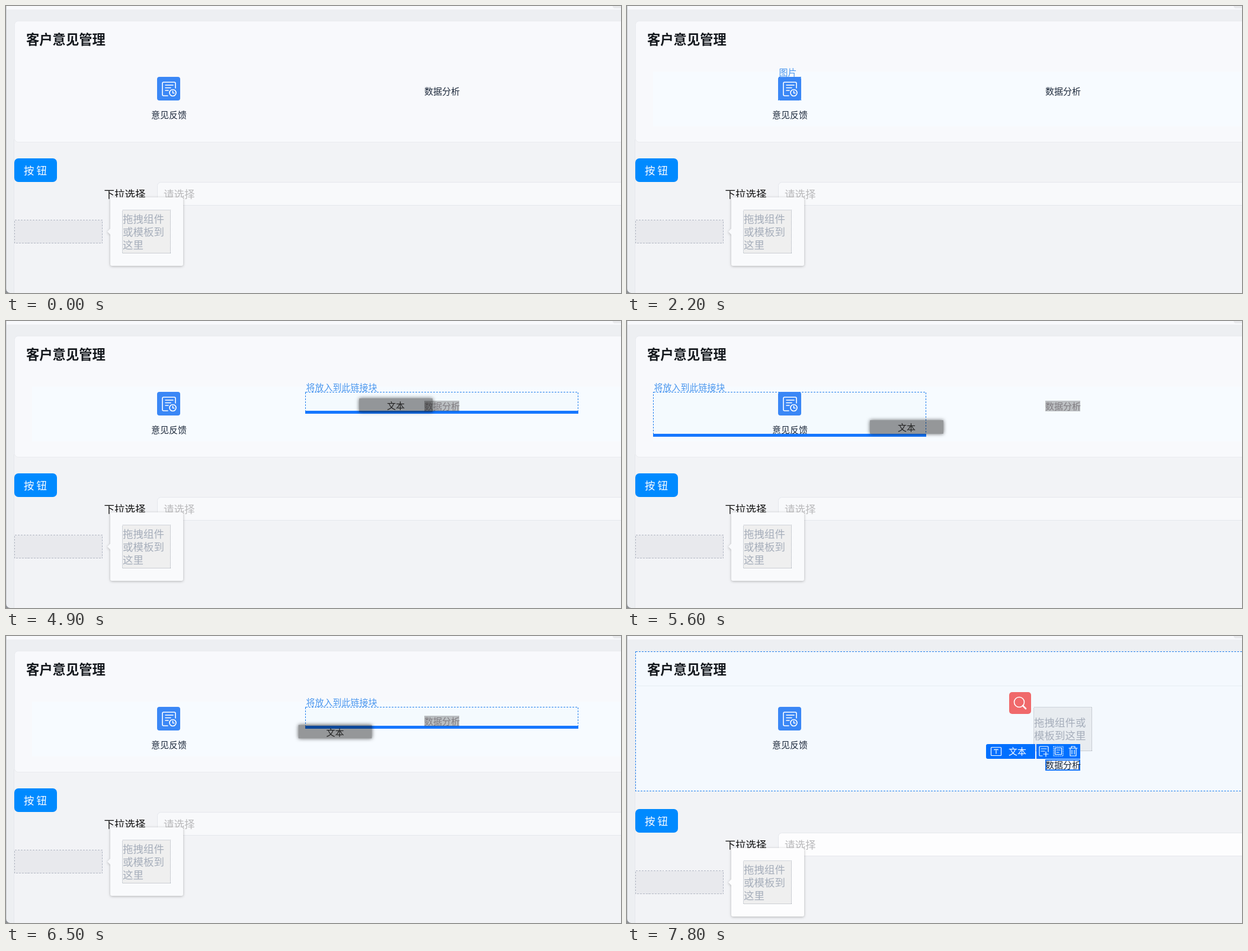
Animation, 1038 px wide and 486 px high, one loop 8000 ms. Source, as an HTML page:

```html
<!DOCTYPE html>
<html lang="zh-CN">
<head>
<meta charset="utf-8">
<title>页面编辑器</title>
<style>
  html, body { margin: 0; width: 100%; height: 100%; overflow: hidden; background: #edeff2; }
  svg { display: block; width: 1038px; height: 486px; }
  text, #pill { font: 17.5px "Noto Sans CJK SC", "Noto Sans", sans-serif; white-space: pre; }
  .sm { font-size: 15px; fill: #1f2b3d; }
  .title { font-size: 22.3px; font-weight: 700; fill: #14181d; }
  .hint { fill: #a6aebb; }
  .card { fill: #f8f9fc; stroke: #e9ebef; }
  .field { fill: #f8f9fb; stroke: #e5e7ec; }
  .pop { fill: #f9fafc; filter: drop-shadow(0 1px 2px #0004); }
  .done .field, .done .pop { fill: #fdfdfe; }
  .dots { stroke: #a9afb9; stroke-dasharray: 1 1; }
  .dash { stroke-dasharray: 3 2; }
  .dots, .dash { shape-rendering: crispEdges; }
  .icon { fill: none; stroke: #fff; stroke-width: 1.6; stroke-linecap: round; stroke-linejoin: round; }
  .thin { stroke-width: 1.2; }
  #frame { fill: #f4fafee6; stroke: #2482ee; }
  #label { fill: #4b97ee; }
  #bar { fill: #1677ff; }
  #pill {
    position: absolute; left: 0; top: 0; width: 124px; height: 23px;
    font-size: 15px; line-height: 23px; text-align: center; color: #222;
    background: #0006; border-radius: 1px; box-shadow: 0 0 6px #0009;
  }
</style>
</head>
<body>
<svg id="stage" viewBox="0 0 1038 486">
  <rect width="1038" height="486" fill="#edeff2"/>
  <rect x="14" y="200" width="1024" height="286" fill="#f2f3f6"/>
  <path d="M13.5 226V486" stroke="#e6e8ec"/>
  <rect width="1038" height="6" fill="#f8f9fc"/>
  <path d="M1024 0h14v4h-10q-4 0-4-4" fill="#e9eaed"/>
  <path d="M.5 0V486" stroke="#c9ccd1"/>
  <path d="M0 479v7h7q-6-1-7-7" fill="#8d9095"/>

  <rect id="card" class="card" x="14.5" y="25.5" width="1040" height="205" rx="6"/>
  <rect id="wash" x="44" y="111" width="994" height="93" fill="#f7fbff"/>
  <g id="hover">
    <rect id="frame" class="dash"/>
    <path id="rule" d="M15 84.5H1038" stroke="#e7eef3"/>
  </g>
  <text class="title" x="34" y="57" dy=".38em">客户意见管理</text>

  <rect x="255" y="120" width="39" height="40" rx="4" fill="#3a87f6"/>
  <g class="icon">
    <path d="M273 152h-7q-2 0-2-2v-19q0-2 2-2h18q2 0 2 2v8M269 134h13M269 138.500h9M269 143h5"/>
    <circle cx="281.500" cy="147" r="5.500"/>
    <path d="M281.500 144v3.500h2.500"/>
  </g>
  <text class="sm" x="245" y="184.500" dy=".38em">意见反馈</text>

  <rect id="bar" height="5" width="461"/>
  <text id="label" class="sm" dy=".38em"/>

  <g id="drop">
    <rect class="dots" x="686.500" y="120.500" width="98" height="74" fill="#e8ecf0"/>
    <text class="hint" x="687" y="146" dy=".38em">拖拽组件或</text>
    <text class="hint" x="687" y="168" dy=".38em">模板到这里</text>
    <path d="M609 183h80v25h-80q-3 0-3-3v-19q0-3 3-3M691 183h74v25h-74z" fill="#0070ff"/>
    <g class="icon thin">
      <rect x="614.500" y="188.500" width="17" height="14" rx="1"/>
      <path d="M620 193v-1h6v1M623 192v7"/>
      <path d="M701 203h-4q-1 0-1-1v-14q0-1 1-1h13q1 0 1 1v8M699 191h9M699 195h6M707 196v8M703 200h8"/>
      <rect x="720" y="187" width="16" height="16" stroke-dasharray="1 2"/>
      <rect x="722.500" y="189.500" width="11" height="11"/>
      <path d="M725 193h6M725 197h4"/>
      <path d="M746 190h14M750 190v-3h6v3M748 190v13h10v-13M751 193v7M755 193v7"/>
    </g>
    <text class="sm" x="644" y="195.500" dy=".38em" style="fill:#fff">文本</text>
    <rect x="707" y="210" width="57" height="17" fill="none" stroke="#1677ff" stroke-width="2"/>
  </g>
  <rect id="held" x="706" y="135" width="59" height="18" fill="#0000003d"/>
  <text id="data" class="sm" x="706" dy=".38em">数据分析</text>

  <g id="red">
    <rect id="redBg" x="645" y="95" width="37" height="37" rx="5"/>
    <g class="icon"><circle cx="662" cy="112" r="8.500"/><path d="M668 118l5 5" stroke-width="2.600"/></g>
  </g>

  <g id="lower">
    <rect x="14" y="258" width="72" height="40" rx="7" fill="#008aff"/>
    <text x="30" y="278" dy=".38em" fill="#fff">按 钮</text>
    <text x="165.500" y="318" dy=".38em" fill="#111">下拉选择</text>
    <rect class="field" x="255.500" y="298.500" width="800" height="39" rx="6"/>
    <text x="266" y="318" dy=".38em" fill="#b9b9bb">请选择</text>
    <rect class="dash" x="14.500" y="362.500" width="148" height="39" fill="#e8e9ed" stroke="#b3b8c4"/>
    <path class="pop" d="M179 324h117q3 0 3 3v110q0 3-3 3H179q-3 0-3-3v-50l-5-5 5-5v-50q0-3 3-3"/>
    <rect class="dots" x="196.500" y="345.500" width="81" height="73" fill="#efefef"/>
    <text class="hint" x="197" y="360" dy=".38em">拖拽组件</text>
    <text class="hint" x="197" y="382" dy=".38em">或模板到</text>
    <text class="hint" x="197" y="404" dy=".38em">这里</text>
  </g>
</svg>
<div id="pill">文本</div>
<script>
const LOOP = 8000, DRAG = 4900, SEARCH = 7200, DROP = 7300;
const $ = id => document.getElementById(id);
const set = (id, attrs) => { for (const k in attrs) $(id).setAttribute(k, attrs[k]); };
const show = (id, on) => { $(id).style.display = on ? '' : 'none'; };

// x, y, width, height, label
const boxes = {
  row: [44, 110, 1010, 93, '容器'],
  left: [44, 120, 460, 73, '链接块'],
  right: [505, 120, 460, 34, '链接块'],
  image: [255, 120, 38, 39, '图片'],
  caption: [244, 176, 60, 17, '文本'],
  data: [706, 135, 59, 18, '文本'],
  card: [14, 26, 1040, 236, '']
};
const hovers = [
  [0, ''], [500, 'row'], [1100, 'data'], [1400, 'right'], [1800, 'left'],
  [2200, 'image'], [3000, 'caption'], [3400, 'left'], [3600, 'right'],
  [3900, 'data'], [DROP, ''], [7800, 'card']
];
// time, x, y of the dragged pill
const path = [
  [4900, 596, 131], [5200, 480, 136], [5400, 400, 158], [5600, 410, 168],
  [5800, 520, 148], [6100, 446, 147], [6200, 378, 142], [6400, 430, 165],
  [6600, 557, 136], [7000, 632, 134.5], [7300, 632, 134.5]
];

function pillAt(t) {
  const i = path.findIndex(p => p[0] > t);
  const [a, b] = [path[i - 1], path[i]];
  const k = (t - a[0]) / (b[0] - a[0]);
  return [1, 2].map(n => a[n] + (b[n] - a[n]) * k);
}

function render(t) {
  const dragging = t >= DRAG && t < DROP, dropped = t >= DROP;
  let name = hovers.filter(h => h[0] <= t).pop()[1];

  if (dragging) {
    const [x, y] = pillAt(t);
    name = x + 62 < 505 ? 'left' : 'right';
    const [bx, by, , bh] = boxes[name];
    const after = y + 11.5 > by + bh / 2;
    set('bar', { x: bx, y: after ? by + bh - 2 : by - 1 });
    $('pill').style.transform = `translate(${x}px, ${y}px)`;
  }

  const box = boxes[name];
  show('hover', box);
  show('label', box);
  if (box) {
    const [x, y, width, height, text] = box;
    set('frame', { x: x + .5, y: y + .5, width, height });
    set('label', { x: x + 1.5, y: y - 8 });
    $('label').textContent = dragging ? '将放入到此链接块' : text;
  }

  show('rule', name === 'card');
  show('bar', dragging);
  show('pill', dragging);
  show('held', dragging);
  show('drop', dropped);
  show('wash', t >= 500 && !dropped);
  show('red', t >= SEARCH);
  set('redBg', { fill: t < 7500 ? '#f54b4b' : '#f0696b' });
  set('data', { y: dropped ? 218.5 : 144.5 });
  $('data').style.fill = dragging ? '#807d82' : '';
  set('card', { height: dropped ? 237 : 205 });
  set('lower', { transform: `translate(0 ${dropped ? 35 : 0})` });
  $('stage').classList.toggle('done', dropped);
}

let start;
function tick(now) {
  start ??= now;
  // the screen updates ten times a second
  render(Math.floor((now - start) % LOOP / 100) * 100);
  requestAnimationFrame(tick);
}
render(0);
requestAnimationFrame(tick);
</script>
</body>
</html>
```
